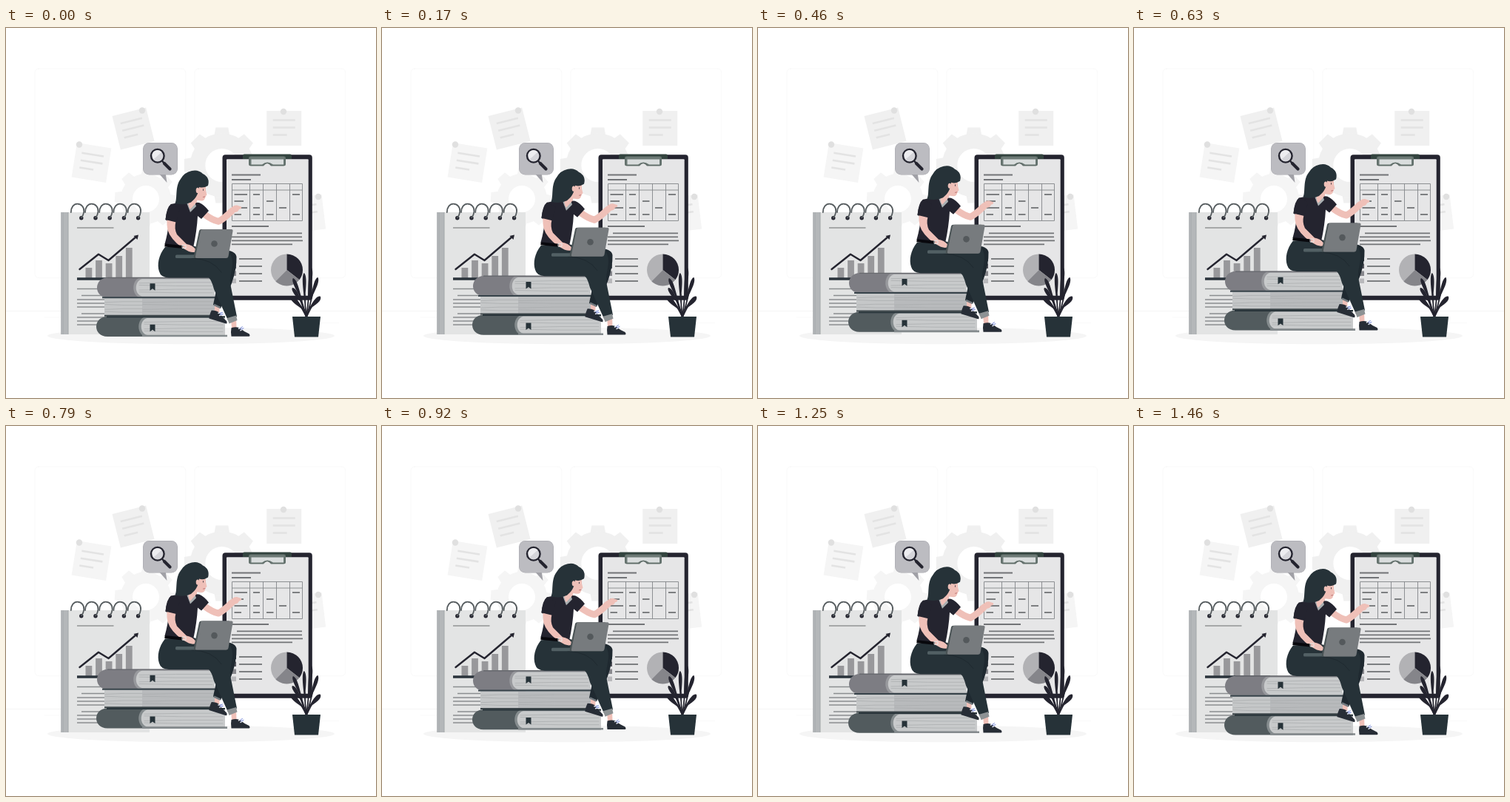
An HTML page with a canvas that plays this animation: 500 by 500 pixels, repeating every 1.5 s.

```html
<!DOCTYPE html>
<html lang="en">
<head>
<meta charset="utf-8">
<title>Research</title>
<style>
html, body { margin: 0; width: 100%; height: 100%; overflow: hidden; background: #fff; }
canvas { display: block; width: 500px; height: 500px; }
</style>
</head>
<body>
<canvas id="stage"></canvas>
<script>
const LOOP = 1500, FPS = 24, LIFT = 10;
const INK = '#24242f', TEAL = '#263238', SKIN = '#efc0b8', PALE = '#f0f0f0', FAINT = '#f5f5f5';
const canvas = document.getElementById('stage');
const scale = Math.max(1, window.devicePixelRatio || 1);
canvas.width = canvas.height = 500 * scale;
const ctx = canvas.getContext('2d');

function fill(color, d) {
  ctx.fillStyle = color;
  ctx.fill(new Path2D(d), 'evenodd');
}
function stroke(color, width, d, cap = 'round') {
  ctx.strokeStyle = color;
  ctx.lineWidth = width;
  ctx.lineCap = cap;
  ctx.lineJoin = 'round';
  ctx.stroke(new Path2D(d));
}
function box(color, x, y, w, h, r = 0) {
  ctx.fillStyle = color;
  ctx.beginPath();
  ctx.roundRect(x, y, w, h, r);
  ctx.fill();
}
function dot(color, x, y, rx, ry = rx) {
  ctx.fillStyle = color;
  ctx.beginPath();
  ctx.ellipse(x, y, rx, ry, 0, 0, Math.PI * 2);
  ctx.fill();
}
const row = (color, width, y, x1, x2) => stroke(color, width, `M${x1} ${y}H${x2}`, 'butt');

function gear(color, x, y, radius, hole, tip, tooth, turn) {
  ctx.save();
  ctx.translate(x, y);
  ctx.rotate(turn);
  for (let i = 0; i < 8; i++) {
    fill(color, `M${-tooth} ${-tip}H${tooth}L${tooth + 2} ${-radius + 3}H${-tooth - 2}Z`);
    ctx.rotate(Math.PI / 4);
  }
  ctx.restore();
  ctx.strokeStyle = color;
  ctx.lineWidth = radius - hole;
  ctx.beginPath();
  ctx.arc(x, y, (radius + hole) / 2, 0, Math.PI * 2);
  ctx.stroke();
}

function note(color, x, y, degrees) {
  ctx.save();
  ctx.translate(x, y);
  ctx.rotate(degrees * Math.PI / 180);
  box(color, -23.5, -23.5, 47, 47);
  [[-11, 15], [-1, 15], [9, 4]].forEach(([ly, end]) => row('#e3e3e3', 2.6, ly, -15, end));
  ctx.restore();
}

function drawRoom() {
  ctx.strokeStyle = '#ebebeb';
  ctx.lineWidth = 0.3;
  for (const x of [39, 255]) {
    ctx.beginPath();
    ctx.roundRect(x, 55, 203.7, 282.6, 5);
    ctx.stroke();
  }
  row('#ebebeb', 0.5, 382.5, 0, 500);
  [[398.6, 417, 450], [389.3, 397, 416], [391, 52, 111], [395.2, 131, 225]]
    .forEach(([y, a, b]) => row('#ebebeb', 0.3, y, a, b));
  dot('#f5f5f5', 250, 416, 194, 11.3);
  gear(PALE, 291.8, 185.5, 43, 22.5, 51, 8.5, 0);
  gear(FAINT, 189, 231, 34, 18, 42, 6.5, 0.06);
  note(PALE, 172, 136, -14);
  note(FAINT, 115.5, 182, 9);
  note(PALE, 375.7, 135.5, 0);
  note(FAINT, 406, 251, -7);
  [[184, 111.5], [99, 157.5], [375, 113], [422, 228]].forEach(([x, y]) => dot('#e0e0e0', x, y, 4.2));
}

function drawNotebook() {
  box('#e3e4e4', 84, 249, 110, 165);
  box('#b4b7b9', 74, 249, 10.3, 165);
  stroke('#a3a7a9', 0.8, 'M77 249V414M84 249V414', 'butt');
  for (let i = 0; i < 5; i++) {
    const x = 101.8 + i * 19.2;
    dot(INK, x, 256.8, 2.7);
    stroke('#565c5f', 1.8, `M${x - 14} 249C${x - 14} 242 ${x - 10} 237.6 ${x - 5.5} 237.6C${x} 237.6 ${x + 4} 242 ${x + 3.5} 248Q${x + 3} 253 ${x} 256.5`);
  }
  row('#929495', 1.7, 270, 96, 145.5);
  [324, 314, 318, 308, 297].forEach((y, i) => box('#98989b', 107.5 + i * 13.6, y, 8.8, 338 - y));
  stroke(INK, 2.4, 'M99.5 326L125 305.8L138.5 314L176 282');
  fill(INK, 'M172.5 281L179 279.5L177.5 286Z');
  row('#2a333b', 3.6, 339, 96, 184);
  const starts = { 352.5: 96, 361.5: 102, 367: 96, 372: 96, 377: 96, 386: 102, 391: 96, 396: 96, 401: 96 };
  for (const y in starts) row('#8b8e90', 1.5, +y, starts[y], 184);
}

function drawBubble() {
  fill('#a0a0a6', 'M206 196L217.5 209L215.5 196Z');
  box('#a6a6ac', 185, 155, 47, 43.5, 8.5);
  box('#bcbcc1', 185.5, 155.5, 46, 42.5, 8);
  stroke(INK, 2.4, 'M210.5 179L213.5 182.5');
  stroke(INK, 4.2, 'M214 183L221.5 190.5');
  dot(INK, 204.8, 172.8, 10);
  dot('#d5d5da', 204.8, 172.8, 7.6);
  fill('#ededf0', 'M197.5 170.5A7.6 7.6 0 0 1 210.5 167.5L199.5 177.5Q197.5 174.5 197.5 170.5Z');
}

function drawClipboard() {
  const gray = '#727477';
  box(INK, 292.5, 171.3, 121.3, 196.5, 4);
  box('#e6e6e7', 298, 177.3, 110.7, 184.5, 1);
  fill('#33443f', 'M320 172.5Q320 170.5 322 170.5H384Q386 170.5 386 172.5V177H320Z');
  fill('#6d7a76', 'M331 173.5H375Q378 173.5 378 176V183.5Q378 186.5 375 186.5H358Q353 179.5 348 186.5H331Q328 186.5 328 183.5V176Q328 173.5 331 173.5Z');
  fill('#d9dddd', 'M331.5 177.5H375V184.5H361Q353 178.5 346 184.5H331.5Z');
  stroke('#5a6763', 0.8, 'M329 174V185.5H347Q353 179.5 359 185.5H377V174');
  row(gray, 2, 198.5, 305, 344);
  row(gray, 2, 205, 305, 331);
  stroke('#83868a', 0.9, 'M305.5 210.5H400.5V260.5H305.5ZM305 219H400.5M329.5 210V260M347.5 210V260M365.5 210V260M383.5 210V260', 'butt');
  const cells = {
    225: [[308.5, 326], [334, 343], [387, 397]],
    234: [[308.5, 321], [352, 361.5]],
    243: [[308.5, 326], [334, 343], [369, 379]],
    252: [[308.5, 318], [334, 343], [352, 361.5], [387, 397]]
  };
  for (const y in cells) cells[y].forEach(([a, b]) => row(gray, 1.8, +y, a, b));
  [[268, 305, 355], [277.3, 312, 400], [282.3, 305, 400], [287.3, 305, 401], [292.3, 305, 387]]
    .forEach(([y, a, b]) => row(gray, 1.8, y, a, b));
  [INK, '#55555d', '#88888d', '#b9b9bc'].forEach((color, i) => {
    box(color, 304.5, 308.5 + i * 10, 6.5, 6.5);
    row(gray, 1.8, 312 + i * 10, 315, 346);
  });
  [['#b2b2b5', 135, 270], [INK, -90, 38], ['#85858a', 38, 135]].forEach(([color, from, to]) => {
    ctx.fillStyle = color;
    ctx.beginPath();
    ctx.moveTo(379.5, 327);
    ctx.arc(379.5, 327, 21.5, from * Math.PI / 180, to * Math.PI / 180);
    ctx.fill();
  });
}

// A paddle-shaped leaf on a thin stem.
function leaf(x, y, tipX, tipY, width) {
  const dx = tipX - x, dy = tipY - y, length = Math.hypot(dx, dy);
  const nx = -dy / length * width, ny = dx / length * width;
  const at = (k, side) => `${x + dx * k + nx * side} ${y + dy * k + ny * side}`;
  stroke(INK, 1.8, `M406 391Q${x} ${y + 4} ${at(0.3, 0)}`);
  fill(INK, `M${x} ${y}C${at(0.4, 0.3)} ${at(0.85, 2)} ${tipX} ${tipY}C${at(0.95, -1.6)} ${at(0.5, -1)} ${x} ${y}Z`);
}

function drawPlant() {
  leaf(404, 372, 403, 331, 2.4);
  leaf(408, 372, 413, 324, 2.4);
  leaf(401, 370, 388, 338, 2.6);
  leaf(411, 370, 421.5, 337, 2.6);
  leaf(402, 374, 387, 351, 2.6);
  leaf(404, 382, 385, 363, 3.2);
  leaf(408, 382, 425, 363, 3.2);
  fill(TEAL, 'M387 390H425L422 417.5H390Z');
}

function pageLines(x1, x2, top, bottom) {
  for (let i = 1; i < 5; i++) {
    const y = top + (bottom - top) * i / 5;
    stroke('#a8abad', 0.7, `M${x1} ${y + (i % 2 ? 1 : -1)}L${(x1 + x2) / 2} ${y}H${x2}`);
  }
}

// A closed book whose rounded spine faces left.
function book(top, bottom, left, pageX, right, cover, rim, markY) {
  fill(cover, `M${right} ${top}H${left + 15}C${left - 5} ${top} ${left - 5} ${bottom} ${left + 15} ${bottom}H${right}Z`);
  fill(rim, `M${right} ${top}H${pageX + 9}C${pageX - 4} ${top + 2} ${pageX - 4} ${bottom - 2} ${pageX + 9} ${bottom}H${right}Z`);
  fill('#c8cacb', `M${right} ${top + 2}H${pageX + 11}C${pageX} ${top + 4} ${pageX} ${bottom - 4} ${pageX + 11} ${bottom - 2}H${right}Z`);
  pageLines(pageX + 7, right - 3, top + 2, bottom - 2);
  fill(TEAL, `M194.5 ${markY}h7v9.5l-3.5 -2.5l-3.5 2.5Z`);
}

function drawBooks() {
  book(390, 417, 122, 180, 296, '#525b5e', '#858c8e', 400.8);
  row(TEAL, 2, 390.3, 136, 296);
  row('#848a8d', 2.6, 416, 184, 299);
  box('#b8babc', 133, 365, 149, 24);
  box('#c5c7c8', 133, 365, 51, 24);
  pageLines(134, 184, 365, 389);
  pageLines(185, 282, 365, 389);
  row('#3b4448', 2, 388.7, 133, 283);
  book(337.2, 364.5, 123, 173, 282, '#7d7d83', '#98999d', 345.2);
  row('#67696e', 1.4, 337.5, 137, 282);
  row('#37434a', 2, 364.2, 130, 283);
}

function shoe(x, y, tilt) {
  ctx.save();
  ctx.translate(x, y);
  ctx.rotate(tilt);
  fill('#272d36', 'M0 1Q6 -1 11 1Q17 6 24 9Q26 12 24 12.5H0Q-1 6 0 1Z');
  stroke('#eceef8', 1.5, 'M10 2L14 0.5M12.5 4.5L15.5 2.5');
  stroke('#6f83d8', 0.9, 'M12 1.5L15 -0.5M13 3L16.5 1.5');
  ctx.restore();
}

function drawLegs() {
  fill(SKIN, 'M282 371L289 374L288 387H282Z');
  shoe(278, 380.5, 0.3);
  fill('#1f2930', 'M285 301Q309 298 311.5 309Q312 325 305 345L290 379L280 374L288 335Z');
  stroke('#737b80', 2.5, 'M281 374L289.5 378', 'butt');
  fill(SKIN, 'M304 394L311 391L311.5 405Q308 408 305 405Z');
  shoe(304.5, 404.3, 0);
  fill(TEAL, 'M215 296C206 307 204 320 207 329Q209 337 220 337.5H274Q278 341 281 353L300 395L312 390L303 345C302 332 311 316 302 304Q292 298 270 300L252 294Z');
  fill('#8d9294', 'M298.8 392L311 388.5L312.5 395L301.5 399.5Z');
  stroke('#1e282e', 0.8, 'M251 311Q279 312 291 330');
}

function drawWoman() {
  drawLegs();
  // Pointing arm
  stroke(SKIN, 9, 'M267 251Q279 260 287 261.5Q293 259 305 247.5');
  fill(SKIN, 'M302 246Q306 239 312 239.5L318 241.5Q319 244 315 245Q314 249 307 249.5Z');
  // Shirt
  fill(INK, 'M223 238Q235 235 247 235L261 236Q268 239 274 247L264 258L259 254Q258 274 253 297L214.5 292Q219 276 220 262L215.5 259Q217 242 223 238Z');
  fill('#aab0b2', 'M244 236L249 249L257 241L255 235Z');
  fill(SKIN, 'M247 228L259 227L258 235L249 245Q245 240 247 228Z');
  // Typing arm
  fill(SKIN, 'M217.5 259L229.5 261.5Q227 271 231 279L244 292Q252 293 257 300Q256 305 247 302L238 297Q222 285 218.5 273Q217 266 217.5 259Z');
  fill(INK, 'M223 238Q217 245 215.5 259L230 262.5L235 244Z');
  stroke('#08080d', 4, 'M214.5 293.5L239 296', 'butt');
  stroke('#e9e9e9', 1, 'M238.5 293.5H243V297.5H238.5Z');
  // Head
  fill(SKIN, 'M254 213L267 207Q270.5 213 270 219.5L271.5 225.5L269.5 227.5Q269 233.5 264 233.5L257 232.5L250 230Z');
  fill(TEAL, 'M251 193Q260 191 266 197Q276 202 273 213Q267 217 261 215C260 227 254 232 250 235.5Q241 240 228.5 237C232 230 228 214 236 204Q241 195 251 193Z');
  dot(SKIN, 259, 219.5, 2.3, 3.6);
  stroke(INK, 0.8, 'M266.5 218V219.5');
  stroke('#b96d6d', 0.9, 'M266.5 228.5L269 228');
}

function drawLaptop() {
  box('#526064', 229, 306.5, 30, 4.5, 1.5);
  fill('#4a5355', 'M264 272H302L298 311H255Q253 311 254 307L261 274Q261.5 272 264 272Z');
  fill('#777b7e', 'M266 272H304.5Q307 272 306.5 274.5L300.5 308.5Q300 311 297.5 311H258Q255.5 311 256 308.5L263 274Q263.5 272 266 272Z');
  dot('#54595c', 281.5, 291.5, 4.3);
}

function draw(now) {
  const frame = Math.floor((now % LOOP + 4) * FPS / 1000) + 1;
  const phase = frame * 1000 / FPS % LOOP / LOOP;
  const lift = LIFT * (1 - Math.abs(1 - 2 * phase));
  ctx.setTransform(scale, 0, 0, scale, 0, 0);
  ctx.fillStyle = '#fff';
  ctx.fillRect(0, 0, 500, 500);
  drawRoom();
  drawNotebook();
  drawBubble();
  drawClipboard();
  drawPlant();
  ctx.translate(0, 0.5 - lift);
  drawBooks();
  drawWoman();
  drawLaptop();
}

const start = performance.now();
function tick() {
  draw(performance.now() - start);
  requestAnimationFrame(tick);
}
tick();
</script>
</body>
</html>
```
